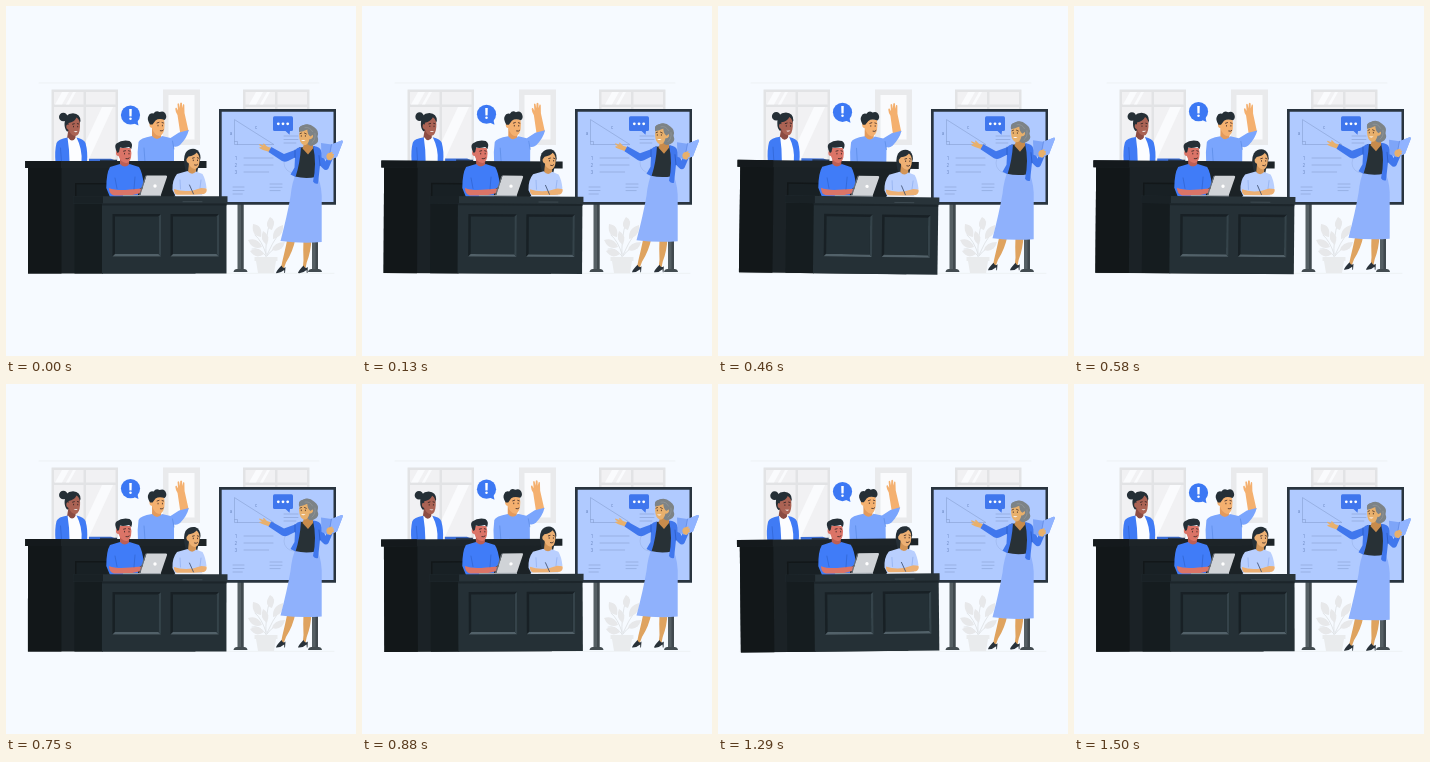
These frames come from a looping animation (350 by 350 pixels, 1540 ms). An HTML page:

```html
<!DOCTYPE html>
<html lang="en">
<head>
<meta charset="utf-8">
<title>Classroom</title>
<style>
html, body { margin: 0; width: 100%; height: 100%; overflow: hidden; background: #f6faff; }
svg { display: block; width: 100vw; height: 100vh; }
.bang { font: 800 14px Inter, sans-serif; fill: #fff; text-anchor: middle; }
.tiny { font: 4.5px Inter, sans-serif; fill: #6f8bc4; text-anchor: middle; }
.line { fill: none; stroke-linecap: round; stroke-linejoin: round; }
</style>
</head>
<body>
<svg viewBox="0 0 350 350">
  <!-- room -->
  <g>
    <path d="M33 77H313M22 267.3H328" class="line" stroke="#e6e9ed" stroke-width=".6"/>
    <path d="M45.500 83.500H112V160H45.500Z" fill="#e2e3e5"/>
    <path d="M48 86H77.500V98.500H48ZM80 86H109.500V98.500H80ZM48 101H77.500V160H48ZM80 101H109.500V160H80Z" fill="#f1f1f3"/>
    <path d="M56 86H63L56 98.500H49ZM67 86H70L63 98.500H60ZM96 101H107L83 153H80V135Z" fill="#fafbfd"/>
    <path d="M157 83.500H194V139H157Z" fill="#e9eaec"/>
    <path d="M162.500 89H188.500V133.500H162.500Z" fill="#fafbfd"/>
    <path d="M237 83.500H303.500V110H237Z" fill="#e2e3e5"/>
    <path d="M239.500 86H269V98.500H239.500ZM271.500 86H301V98.500H271.500ZM239.500 101H269V110H239.500ZM271.500 101H301V110H271.500Z" fill="#f1f1f3"/>
    <path d="M250 86H257L250 98.500H243ZM261 86H264L257 98.500H254Z" fill="#fafbfd"/>
  </g>

  <!-- plant -->
  <g fill="#e7e8ea">
    <path class="line" d="M260 252Q259 232 264 216M260 248Q256 235 249 229M261 249Q266 237 274 226M260 250Q253 241 246 243M261 250Q268 240 275 242" stroke="#dfe2e6" stroke-width=".9"/>
    <path d="M264 211Q271 214 266 224Q257 221 264 211ZM247 218Q257 219 255 231Q245 230 247 218ZM277 219Q278 230 267 233Q266 222 277 219ZM242 234Q252 231 256 241Q247 245 242 234ZM279 236Q276 247 266 244Q268 236 279 236ZM244 245Q253 240 258 248Q250 254 244 245ZM257 225Q265 229 261 239Q253 234 257 225Z"/>
    <path d="M248.500 251H271.500V255H248.500ZM250 255H270L268 267H252Z" fill="#e9ebed"/>
  </g>

  <!-- board -->
  <g>
    <path d="M231.500 197H237.500V264H231.500ZM306 197H312V264H306Z" fill="#555f64"/>
    <path d="M235 197H237.500V264H235ZM309.500 197H312V264H309.500Z" fill="#40494e"/>
    <path d="M227.500 266Q228 263 231 263H238Q241 263 241.500 266ZM302 266Q302.500 263 305.500 263H312.500Q315.500 263 316 266Z" fill="#434c51"/>
    <path d="M213 103H330V198.700H213Z" fill="#29343f"/>
    <path d="M215.700 105.700H327.500V196H215.700Z" fill="#b0caff"/>
    <g class="line" stroke="#869fd2" stroke-width=".6">
      <path d="M228.500 114V138.500H267.500ZM228.500 135.500H231.500V138.500"/>
      <circle cx="288" cy="157" r="10" stroke="#9ab4ea"/>
      <path id="notes"/>
    </g>
    <g class="tiny">
      <text x="225" y="128.500">a</text><text x="250" y="123">c</text>
      <text x="229.800" y="153.700">1</text><text x="229.800" y="160.700">2</text><text x="229.800" y="167.700">3</text>
    </g>
    <path d="M268.500 110.300H285.500Q287 110.300 287 112V123.500Q287 125 285.500 125H284L283.500 128.800L279.500 125H268.500Q267 125 267 123.500V112Q267 110.300 268.500 110.300Z" fill="#3f76ed"/>
    <g fill="#fff"><circle cx="272.300" cy="117.800" r="1.400"/><circle cx="277" cy="117.800" r="1.400"/><circle cx="281.700" cy="117.800" r="1.400"/></g>
  </g>

  <!-- students and desks -->
  <g id="students">
    <!-- standing girl -->
    <g>
      <circle cx="57.300" cy="111" r="4.300" fill="#252f36"/>
      <path d="M58.500 118Q58 107.500 67 107.200Q74.500 107.800 74.500 115L71 124L61 125.500Q58.500 123 58.500 118Z" fill="#252f36"/>
      <path d="M62.500 123H69.500V133L66.500 138L61 132.500Z" fill="#8c4c42"/>
      <path d="M62.500 117Q68.500 116 70.500 111.500Q74.500 114 74 121Q73.500 129.500 69.500 130Q64.500 129.500 62.800 124Q59.800 123 60.300 119.800Q61.200 117.500 62.500 119Z" fill="#ab6354"/>
      <path d="M60 133L62 131.500Q66 137.500 70 131.500L75 135L77 156H61Z" fill="#fcfdff"/>
      <path d="M61.500 131.500Q52 133 50.500 137Q48.500 145 49.500 156H63.500Q63.500 144 61.500 131.500ZM70.500 131.500Q78 133 79.500 137Q82 146 81 156H75.500Q76.500 143 70.500 131.500Z" fill="#407bf5"/>
      <path d="M54.500 142L55.500 156" class="line" stroke="#2d5fca" stroke-width=".6"/>
      <path d="M66.500 118.200L68.300 117.700M71.300 117.600L72.700 118M67.500 120.300V120.900M71.700 120.300V120.900" class="line" stroke="#2b2021" stroke-width=".8"/>
      <path d="M67.500 125.300Q69.700 127 71.700 125.200Z" fill="#fff"/>
    </g>
    <!-- boy with raised hand -->
    <g>
      <path d="M171.500 109Q169.500 106 169.300 103Q169.300 101.500 170.500 101.800L172 104.500L171.500 98Q172.300 96.500 173.100 98L173.800 102L174.200 97Q175.200 95.700 176 97.300L176.100 102L177.100 98.300Q178.200 97.800 178.300 99L178.500 107L182.500 125L174.500 129Z" fill="#f4b06f"/>
      <path d="M146 122H155V132L151 136L146 131Z" fill="#e39a5c"/>
      <path d="M146 130Q151 136 156 130L164.500 132L173 126.500L182.800 124Q181 132 174 139Q171 141.500 168 140.500V157H132Q131 146 132.500 136Q134 132 146 130Z" fill="#7aa5fd"/>
      <path d="M145.500 113H158Q159 118 158.300 123Q157 129.500 153.300 130Q148 129 146 122Q143 121.500 143.500 117.500Z" fill="#f4b06f"/>
      <path d="M144 118.500Q140.500 113 142.500 110Q143.500 106.500 147.500 107.500Q150 103.800 153.500 106Q158.500 104 160 109Q161 112 158.500 114Q153 112 149.500 114.500L146.500 118.500Z" fill="#252f36"/>
      <path d="M138 142L139 156M166.500 135L168 143" class="line" stroke="#5485e0" stroke-width=".6"/>
      <path d="M151 117L153 116.300M156 116.500L157.500 117M152 119.200V119.900M156.400 119.200V119.900M154.300 124.800Q156.500 125.500 157.300 124.200" class="line" stroke="#3b2927" stroke-width=".8"/>
    </g>
    <!-- back desk -->
    <path d="M83 152.700H105L112 155.500H83Z" fill="#3c6fd8"/>
    <path d="M94 153.700H111V155.500H94Z" fill="#263956"/>
    <path d="M22 161H189.500V267.500H22Z" fill="#1b2226"/>
    <path d="M22 161H55.500V267.500H22Z" fill="#121719"/>
    <path d="M69 177H101V192H69Z" fill="#121719"/>
    <path d="M70.500 178.500H101V192H70.500Z" fill="#182024"/>
    <path d="M19.200 155H200.500V162H19.200Z" fill="#1d2428"/>
    <path d="M19.200 155H55V162H19.200Z" fill="#14191c"/>
    <!-- seated boy -->
    <g>
      <path d="M114 149H123V160L118 163L114 159Z" fill="#bd5f55"/>
      <path d="M114 158Q119 163 123.500 158L133 161Q136.500 166 138 180L132 184V191H104L100.300 182Q100.300 167 104 161Z" fill="#407cf8"/>
      <path d="M111.500 142H124.500Q126 147 125 151.500Q123.500 157 120 157Q114.500 156 112.500 150Q109.500 150 110 146Z" fill="#db7467"/>
      <path d="M111.500 147Q107.500 140 110.500 137.500Q116 133.500 123.500 135Q127.500 137.500 125.300 143L123 141Q117 142.500 114 141.500L113 146Z" fill="#252f36"/>
      <path d="M103 182Q110 185 124 183.500L135.500 182.500Q138.500 185 135 187L124 189.500H108Q103 188 103 182Z" fill="#db7467"/>
      <path d="M109 172L111 182.500M129 171L128 183" class="line" stroke="#2c5ec7" stroke-width=".6"/>
      <path d="M117.500 145.200L119.500 144.700M122.500 144.700L124 145.200M118.500 147.300V148M123 147.300V148M120 152.700Q122 153.300 123.300 152" class="line" stroke="#342423" stroke-width=".8"/>
    </g>
    <!-- seated girl -->
    <g>
      <path d="M179.500 164Q176.500 153 179.500 147Q183 142 189 143Q194.500 145 194.500 152L191 167H182Z" fill="#252f36"/>
      <path d="M183 157H190V167L186.500 170L182 166Z" fill="#d39557"/>
      <path d="M181.500 165Q186 170 190 165.500L196.500 168Q199.500 173 200.500 182L196 185V191H170L166.500 184Q166 174 171 168Z" fill="#b9cffe"/>
      <path d="M182.500 150.500Q188.500 149.500 190.500 146.500Q194 149 193.500 155Q193 163 188.500 163Q184 162 182.500 157Q180 156 180.500 153Z" fill="#edb073"/>
      <path d="M168 183Q176 186 187 184.500L195 182L200.500 182.500Q201.500 186 198 188L184 189.500H172Q167.500 188 168 183Z" fill="#edb073"/>
      <path d="M183.500 179L187.500 188" class="line" stroke="#394a69" stroke-width=".8"/>
      <path d="M174 174L174.500 183M195 174L194 182" class="line" stroke="#86a7ec" stroke-width=".6"/>
      <path d="M186.500 152.200L188.200 151.700M191.300 151.700L192.500 152.200M187.300 154V154.700M191.500 154V154.700M188.500 159Q190.500 160 191.500 158.500" class="line" stroke="#342423" stroke-width=".8"/>
    </g>
    <!-- laptop -->
    <path d="M140.500 169.500H160Q161.500 169.500 161 171L154.500 190H134Z" fill="#d0d3d7"/>
    <path d="M140.500 169.500L139.300 169.800L132.800 189.800L134 190Z" fill="#6b7178"/>
    <circle cx="149" cy="180" r="1.700" fill="#fff"/>
    <path d="M117 189H155V190.500H117Z" fill="#9ca3aa"/>
    <path d="M170 188.700H196L199 190.500H168Z" fill="#e9edf6"/>
    <!-- front desk -->
    <path d="M68.500 196H97V267.500H68.500Z" fill="#151c1f"/>
    <path d="M96 196H220.500V267.500H96Z" fill="#253036"/>
    <path d="M67.300 190.200H221.500V197.500H67.300Z" fill="#283339"/>
    <path d="M67.300 190.200H97V197.500H67.300Z" fill="#192125"/>
    <path d="M96 197.500H220.500V199.500H96Z" fill="#1c252a"/>
    <g id="panel">
      <path d="M106.500 208H155V250.500H106.500Z" fill="#182025"/>
      <path d="M106.500 250.500L109 248H152.500L155 250.500Z" fill="#526169"/>
      <path d="M155 208L152.500 210.500V248L155 250.500Z" fill="#35434a"/>
      <path d="M109 210.500H152.500V248H109Z" fill="#243036"/>
    </g>
    <use href="#panel" x="58"/>
    <path d="M177 195.700H196" class="line" stroke="#536168" stroke-width=".5"/>
  </g>

  <!-- floating alert -->
  <g id="alert">
    <path d="M127 117L132.500 119.500L131.300 114Z" fill="#3c78f4"/>
    <circle cx="124.500" cy="109" r="9.600" fill="#3c78f4"/>
    <text class="bang" x="124.500" y="114">!</text>
  </g>

  <!-- teacher -->
  <g id="teacher">
    <path d="M281.500 233H289.500Q287 246 280 257L277 265H274.500L276.300 256Q279 245 281.500 233ZM297.500 233H305.500Q305 246 300.700 257L299 265H296.500L297.500 255Q297 244 297.500 233Z" fill="#dfa35f"/>
    <path d="M275.500 260Q277 264 279.500 261.500L279 267.500H278.300L278.200 264.500Q274.500 267.800 270 267.500Q270 265.800 275.500 260ZM297.500 260Q299 264 301.800 261.500L301.500 267.500H300.800L300.500 264.500Q297 268 292 267.500Q292 265.800 297.500 260Z" fill="#29323a"/>
    <path d="M290.500 167H309.500Q315 176 315.700 190V236.500Q295 238 274.500 235.500Q281 211 284.500 191Q286 176 290.500 167Z" fill="#8fb1fc"/>
    <path d="M293 142L309 141L310 171.500Q299 173.500 289 171Z" fill="#283136"/>
    <path d="M299 135H307V143L302 149L296.500 143Z" fill="#c88b4c"/>
    <!-- hair and head -->
    <path d="M293.500 126Q291.500 121 297 119.700Q303 116.700 308 121.500Q313.500 125 311.500 131Q314 137 308 139.500Q303 142 301 137Z" fill="#7d8386"/>
    <path d="M294 124Q300 124.500 302.500 123Q303.500 127 305.500 129Q307.500 128.500 307 131.500Q306 134 303.500 133.500Q302 140 298 139.500Q293.500 138.500 293 130Z" fill="#e8b06c"/>
    <path d="M293 126.500Q292 120.500 297 119.700Q302 117.500 305 121Q305 126 307 129L304.500 131Q301.500 129 301.300 123.800Q297 126 293 126.500Z" fill="#7d8386"/>
    <path d="M299 122Q304 121 306.500 126M309 128Q310 134 306 137" class="line" stroke="#989da0" stroke-width=".6"/>
    <path d="M294 128.100L295.500 127.500M298.500 127.500L300.300 128.300M295.300 130V130.700M299.400 130V130.700" class="line" stroke="#463129" stroke-width=".8"/>
    <path d="M295 134.300Q297.300 136.300 299.500 134.300Z" fill="#fff"/>
    <!-- arms and jacket -->
    <path d="M265.500 142.500L261 141L258 138Q256.500 137.500 257.500 140L253.500 138.500Q252.700 139 253.500 139.800L256 141.500L253.500 141.700Q253 142.500 254 143L257 144.300L262 146L265 147Z" fill="#e8b06c"/>
    <path d="M295 141.500Q291 142 289 144.500L278 148.500L265.300 141.500L262.500 146.500L276 155.500Q279 157 282 155.500L289 152L288.500 162L284.500 169L289.500 171.500Q294 158 295 141.500Z" fill="#4077ed"/>
    <path d="M307 140.500Q314 141 315 145L319.500 156L322 149.500L327 152.500L322.500 163Q320 166 317 163L314 160L312 178Q309 179 307 176Q311 158 307 140.500Z" fill="#4077ed"/>
    <path d="M289 144.500L289 152M313 150L314 160" class="line" stroke="#2756bd" stroke-width=".7"/>
    <path d="M315 137.500L325.500 139L335.500 135Q337.200 134.500 336.800 136.500L331 151.500L322.500 155L315.500 152Z" fill="#7ea5f8"/>
    <path d="M325.500 139L335.500 135Q337.200 134.500 336.800 136.500L331 151.500L322.500 155Z" fill="#90b3ff"/>
    <path d="M325.500 139L322.500 155" class="line" stroke="#557fdb" stroke-width=".6"/>
    <path d="M320.500 152Q319.800 149 322.500 147.500L326.300 146.500Q327.500 147.300 326 148.300L328 148.500Q328.500 149.500 327 150L328 151Q328 152.300 326.500 152.300L325 155L321.500 154Z" fill="#e8b06c"/>
  </g>
</svg>
<script>
const LOOP = 1540, TILT = 0.9, ALERT_RISE = 4.5, TEACHER_RISE = 3.6, TEACHER_BASE = -0.4;
const [students, alertBubble, teacher] =
  ['students', 'alert', 'teacher'].map(id => document.getElementById(id));

// Rows of written notes: x, width, first y, gap, count.
const blocks = [
  [238, 29, 152, 7, 3], [227, 11, 181, 3.5, 3],
  [264, 12, 178, 3.3, 3], [278, 14, 130, 3.5, 3]
];
document.getElementById('notes').setAttribute('d', blocks.map(([x, w, y, gap, n]) =>
  Array.from({ length: n }, (_, i) => `M${x} ${y + i * gap}h${w - (i === n - 1 ? w * .15 : 0)}`).join('')
).join(''));

// Straight ramp 0 -> 1 -> 0 over one loop.
const ramp = p => 1 - Math.abs(1 - 2 * p);
const lift = (el, y) => el.setAttribute('transform', `translate(0 ${y})`);

function draw(time) {
  const p = (time % LOOP) / LOOP;
  const sway = 2 * ramp((p + .25) % 1) - 1;
  students.setAttribute('transform', `rotate(${TILT * sway} 120 182)`);
  lift(alertBubble, -ALERT_RISE * ramp(p));
  lift(teacher, TEACHER_BASE - TEACHER_RISE * Math.sin(Math.PI * p));
}

let start;
function tick(now) {
  start ??= now;
  draw(now - start);
  requestAnimationFrame(tick);
}
draw(0);
requestAnimationFrame(tick);
</script>
</body>
</html>
```
